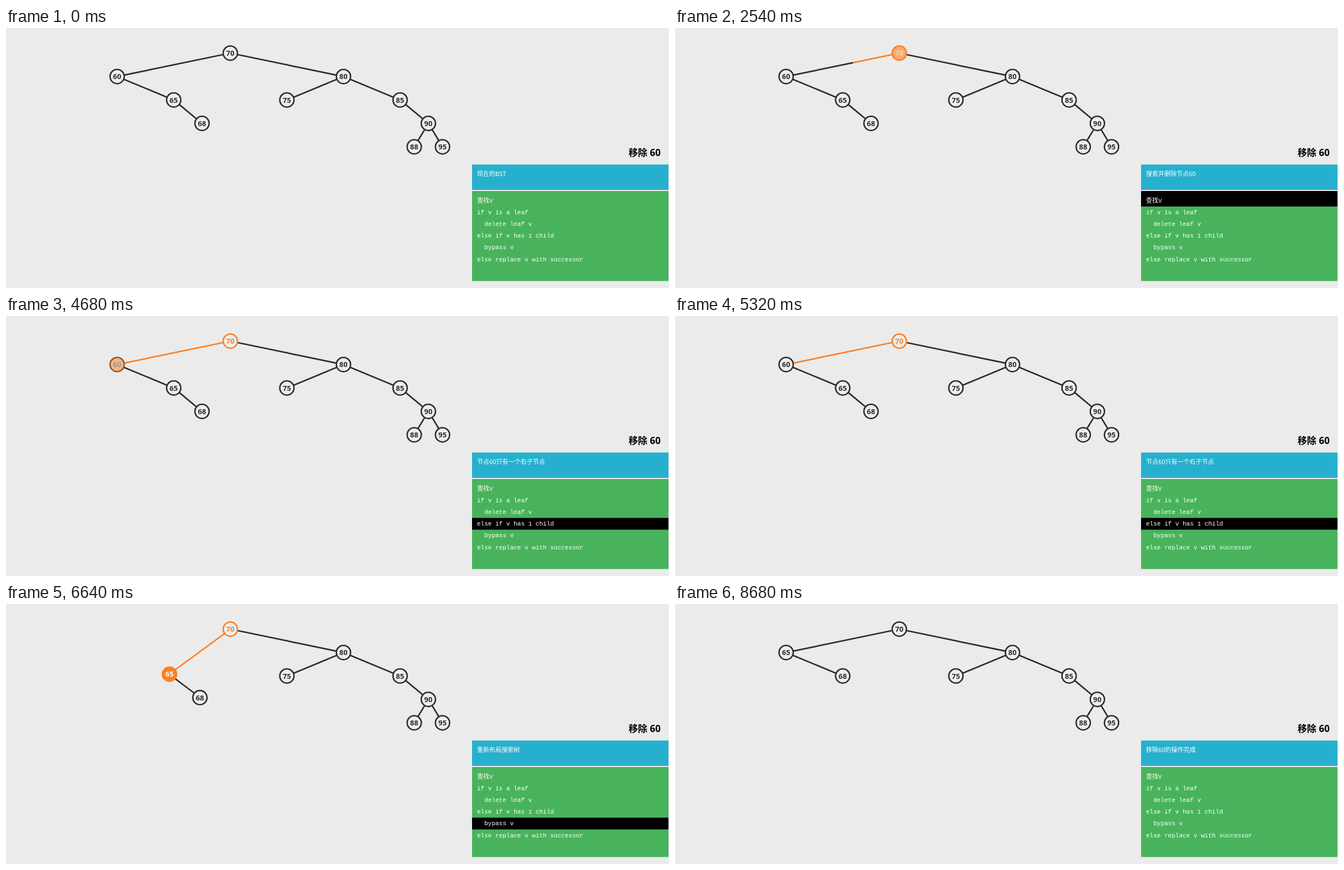
An HTML page for the animation above (8.72 s loop, 1195 px wide and 469 px high).

```html
<!DOCTYPE html>
<html lang="zh-CN">
<head>
<meta charset="utf-8">
<title>BST</title>
<style>
html, body { margin: 0; width: 100%; height: 100%; overflow: hidden; background: #ebebeb; }
svg { display: block; width: 1195px; height: 469px; }
text { white-space: pre; }
.node circle { stroke-width: 2.6; }
.node text { font: 700 13px "Noto Sans", "Open Sans", sans-serif; text-anchor: middle; }
.edge { stroke-width: 2.7; }
.title { font: 700 17px "Noto Sans", "Noto Sans CJK SC", sans-serif; text-anchor: end; }
.status { font: 500 11px "Noto Sans", "Noto Sans CJK SC", sans-serif; fill: #fff; }
.code { font: 11px "Liberation Mono", "Noto Sans CJK SC", monospace; fill: #fff; }
.code.first { font-weight: 500; }
</style>
</head>
<body>
<svg viewBox="0 0 1195 469">
  <g id="edges"></g>
  <g id="nodes"></g>
  <text class="title" x="1180" y="231">移除 60</text>
  <rect x="840" y="246.3" width="354" height="45.7" fill="#27b0cd"/>
  <text class="status" id="status" x="849" y="267"></text>
  <rect x="840" y="294" width="354" height="162.4" fill="#48b35c"/>
  <rect id="bar" x="840" width="354"/>
  <g id="code"></g>
</svg>
<script>
const LOOP = 8720, FADE = 750, TRIM = 13.5;
const DARK = [45, 45, 45], PALE = [237, 237, 237], ORANGE = [250, 128, 36], WHITE = [255, 255, 255];
const LOOK = {
  normal: [DARK, PALE, DARK],
  active: [ORANGE, ORANGE, WHITE],
  passed: [ORANGE, PALE, ORANGE]
};

const STEPS = [
  { at: 0, msg: '现在的BST' },
  { at: 1132, msg: '搜索并删除节点60', line: 0, active: 70 },
  { at: 2194, msg: '搜索并删除节点60', line: 0, passed: 70 },
  { at: 3256, msg: '搜索并删除节点60', line: 0, passed: 70, active: 60 },
  { at: 4310, msg: '节点60只有一个右子节点', line: 3, passed: 70 },
  { at: 5380, msg: '删除节点60并将其父节点连接到其右子节点', line: 4, passed: 70, active: 65 },
  { at: 6442, msg: '重新布局搜索树', line: 4, passed: 70, active: 65 },
  { at: 7504, msg: '移除60的操作完成' }
];
const GROW = 2, BYPASS = 5, RELAYOUT = 6, DONE = 7;

const CODE = ['查找V', 'if v is a leaf', '  delete leaf v',
  'else if v has 1 child', '  bypass v', 'else replace v with successor'];

const place = (dx, depth) => [404.3 + 51 * dx, 45.3 + 42.25 * depth];
const HOME = {
  70: place(0, 0), 60: place(-4, 1), 80: place(4, 1), 65: place(-2, 2), 75: place(2, 2),
  85: place(6, 2), 68: place(-1, 3), 90: place(7, 3), 88: place(6.5, 4), 95: place(7.5, 4)
};
const MOVED = { 65: HOME[60], 68: HOME[65] };
const EDGES = [[70, 80], [80, 75], [80, 85], [85, 90], [90, 88], [90, 95], [65, 68]];

const mix = (a, b, p) => a.map((v, i) => v + (b[i] - v) * p);
const rgb = c => `rgb(${c.map(Math.round)})`;
const ease = u => u < .5 ? 4 * u ** 3 : 1 - 4 * (1 - u) ** 3;
const $ = id => document.getElementById(id);

function add(parent, tag, attrs = {}, text = '') {
  const el = document.createElementNS('http://www.w3.org/2000/svg', tag);
  set(el, attrs);
  el.textContent = text;
  return parent.appendChild(el);
}
function set(el, attrs) {
  for (const k in attrs) el.setAttribute(k, attrs[k]);
}

const spot = (id, k) => (k >= RELAYOUT && MOVED[id]) || HOME[id];
const look = (id, k) => {
  const s = STEPS[k];
  return LOOK[s.active === id ? 'active' : s.passed === id ? 'passed' : 'normal'];
};

// Line between two nodes, cut at their rims: [x1, y1, x2, y2]
function span(a, b, k) {
  const [x1, y1] = spot(a, k), [x2, y2] = spot(b, k);
  const d = TRIM / Math.hypot(x2 - x1, y2 - y1);
  const dx = (x2 - x1) * d, dy = (y2 - y1) * d;
  return [x1 + dx, y1 + dy, x2 - dx, y2 - dy];
}
const childSpan = k => k < BYPASS ? span(60, 65, k) : span(70, 65, k);
const childColor = k => k >= BYPASS && k < DONE ? ORANGE : DARK;

const line = () => add($('edges'), 'line', { class: 'edge' });
const drawLine = (el, [x1, y1, x2, y2], color) =>
  set(el, { x1, y1, x2, y2, stroke: rgb(color) });

const edgeEls = EDGES.map(line);
const childEl = line(), restEl = line(), trailEl = line();

const nodes = Object.keys(HOME).map(key => {
  const g = add($('nodes'), 'g', { class: 'node' });
  return {
    id: +key, g,
    circle: add(g, 'circle', { r: 12.8 }),
    label: add(g, 'text', { y: 4.7 }, key)
  };
});

CODE.forEach((s, i) => add($('code'), 'text', {
  class: i ? 'code' : 'code first',
  x: s.startsWith(' ') ? 862.2 : 849,
  y: 314.8 + 21.15 * i
}, s.trim()));

function drawTree(k, p) {
  const from = Math.max(k - 1, 0);
  const between = f => mix(f(from), f(k), p);

  EDGES.forEach(([a, b], i) => drawLine(edgeEls[i], between(s => span(a, b, s)), DARK));
  drawLine(childEl, between(childSpan), between(childColor));

  // Left edge of the root: orange trail grows, then folds back to its start
  const [x1, y1, x2, y2] = span(70, 60, 0);
  const reach = k < GROW ? 0 : k === GROW ? p : k < BYPASS ? 1 : k === BYPASS ? 1 - p : 0;
  const [tx, ty] = mix([x1, y1], [x2, y2], reach);
  drawLine(trailEl, [x1, y1, tx, ty], ORANGE);
  drawLine(restEl, [tx, ty, x2, y2], DARK);
  set(trailEl, { visibility: reach > 0 ? 'visible' : 'hidden' });
  set(restEl, { visibility: k <= GROW && reach < 1 ? 'visible' : 'hidden' });

  for (const { id, g, circle, label } of nodes) {
    const [x, y] = between(s => spot(id, s));
    const [rim, fill, ink] = [0, 1, 2].map(i => rgb(between(s => look(id, s)[i])));
    const size = id !== 60 || k < BYPASS ? 1 : k === BYPASS ? 1 - p : 0;
    set(g, {
      transform: `translate(${x} ${y}) scale(${size})`,
      visibility: size > 0 ? 'visible' : 'hidden'
    });
    set(circle, { stroke: rim, fill });
    set(label, { fill: ink });
  }
}

function drawPanel({ msg, line }) {
  if ($('status').textContent !== msg) $('status').textContent = msg;
  const on = line !== undefined;
  set($('bar'), {
    y: line ? 300.8 + 21.15 * line : 294,
    height: line ? 21.2 : 28,
    visibility: on ? 'visible' : 'hidden'
  });
}

function frame() {
  const t = performance.now() % LOOP;
  const k = STEPS.filter(s => s.at <= t).length - 1;
  drawTree(k, ease(Math.min(1, (t - STEPS[k].at) / FADE)));
  drawPanel(STEPS[k]);
  requestAnimationFrame(frame);
}
frame();
</script>
</body>
</html>
```
